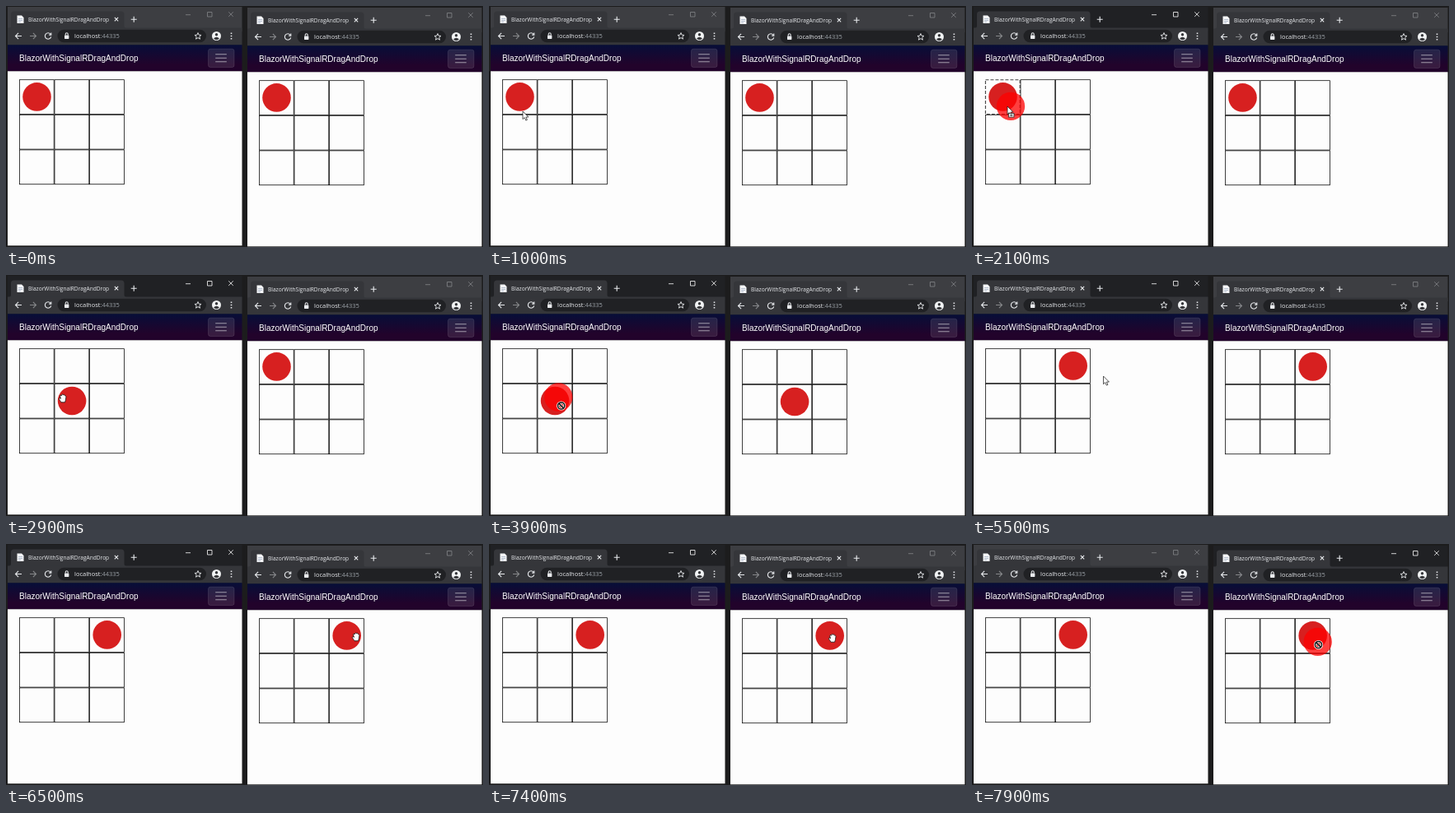
These frames come from a looping animation (579 px wide and 293 px high, 8000 ms). An HTML page:

```html
<!DOCTYPE html>
<html lang="en">
<head>
<meta charset="utf-8">
<title>Drag and drop</title>
<style>
html, body { margin: 0; width: 100%; height: 100%; overflow: hidden; background: #1c1c1d; }
svg { display: block; }
text { font-family: "Open Sans", sans-serif; white-space: pre; }
.brand { font: 10px "Liberation Sans", Arial, sans-serif; fill: #fff; }
.line { fill: none; stroke: #e8eaed; stroke-width: 1.1; }
.frame { fill: #3d3e42; }
.buttons { fill: none; stroke: #85868a; stroke-width: .8; }
.active .frame { fill: #202124; }
.active .buttons { stroke: #fff; }
.cell { fill: none; stroke: #000; stroke-width: .75; }
.cell.over { stroke: #444; stroke-width: 1.1; stroke-dasharray: 4 2; }
</style>
</head>
<body>
<svg id="stage" width="579" height="293" viewBox="0 0 579 293">
  <defs>
    <linearGradient id="nav" x2="0" y2="1">
      <stop offset="0" stop-color="#070e38"/>
      <stop offset=".75" stop-color="#22032b"/>
    </linearGradient>
  </defs>
  <g id="windows"></g>
  <circle id="ghost" r="17.2" fill="red" fill-opacity=".75"/>
  <g id="pointer">
    <g id="arrow">
      <path d="M0 0V9.6L2.2 7.6 3.8 11.1 5.4 10.4 3.9 7H6.9Z" fill="#fff" stroke="#111" stroke-width=".7"/>
      <g id="copy">
        <rect x="1.5" y="8.5" width="6.5" height="4.6" fill="#eee" stroke="#333" stroke-width=".8"/>
        <path d="M3 10.8h3.5M4.75 9.4v2.8" stroke="#333" stroke-width=".8"/>
      </g>
    </g>
    <path id="hand" d="M-2 4.8C-3 3-4.5 1.6-4.6.2-4.2-.8-3.2-.3-2.6.4L-3.4-3C-3.2-4.2-2.2-4-1.9-3L-1.3-4.4C-.8-5.2.2-5 .3-4L1-4.5C1.8-4.9 2.4-4.2 2.4-3.2 3.4-3.6 4-2.8 3.9-1.8L3.4 2 2.5 4.8Z" fill="#fff" stroke="#111" stroke-width=".8"/>
    <g id="deny" fill="none">
      <circle r="4.1" stroke="#fff" stroke-width="3"/>
      <path d="M-3-3 3 3" stroke="#fff" stroke-width="3"/>
      <circle r="4.1" stroke="#111" stroke-width="1.5"/>
      <path d="M-2.9-2.9 2.9 2.9" stroke="#111" stroke-width="1.5"/>
    </g>
  </g>
</svg>
<script>
const LOOP = 8000, STEP = 100, CELL = 42.6, LEFT = 16, TOP = 89.3;
const $ = id => document.getElementById(id);
const centre = cell => [37.5 + cell % 3 * CELL, 110.4 + Math.floor(cell / 3) * CELL];

const cells = [...Array(9).keys()].map(i =>
  `<rect class="cell" x="${LEFT + .4 + i % 3 * CELL}" y="${TOP + .4 + Math.floor(i / 3) * CELL}" width="${CELL - .8}" height="${CELL - .8}"/>`).join('');

const windowMarkup = i => `<g class="window" transform="translate(${291 * i} ${i})">
  <rect class="frame" x="2" y="1" width="284.5" height="30"/>
  <path d="M3 27Q6 27 6 24V10Q6 6.500 9.500 6.500H140Q143.500 6.500 143.500 10V24Q143.500 27 146.500 27Z" fill="#35363a"/>
  <path d="M13.500 11.500h5.500l2.500 2.500v7h-8z" fill="#f4f5f7"/>
  <path d="M15 15.500h5M15 17.500h5M15 19.300h3" stroke="#9aa6bd" stroke-width=".7"/>
  <text x="27" y="18.800" font-size="6.600" fill="#e8eaed">BlazorWithSignalRDragAndDrop</text>
  <path class="line" d="M131.800 13.900l4.400 4.400m0-4.400l-4.400 4.400M151.700 16.200h7M155.200 12.700v7"/>
  <path class="buttons" d="M218 10.700h6M244.500 7.500h5.500v5.500h-5.500zM270.200 7.300l5.600 5.600m0-5.600l-5.600 5.600"/>
  <rect x="2" y="26.500" width="284.500" height="21" fill="#35363a"/>
  <path class="line" d="M19 36.500h-7.500m3.600-3.600l-3.600 3.600 3.600 3.600"/>
  <path class="line" d="M29 36.500h7.500m-3.600-3.600l3.600 3.600-3.600 3.600" opacity=".45"/>
  <path class="line" d="M54 34.200A3.700 3.700 0 1 0 54.700 37.300M54.800 32.500v2.600h-2.600"/>
  <rect x="62.500" y="28.700" width="180.500" height="15.600" rx="7.800" fill="#202124"/>
  <rect x="71" y="35.400" width="5.400" height="4.500" rx=".6" fill="#e8eaed"/>
  <path class="line" d="M72.200 35.500v-1.200a1.500 1.500 0 0 1 3 0v1.200"/>
  <text x="83" y="39.200" font-size="7.500" fill="#e8eaed">localhost<tspan fill="#9aa0a6">:44335</tspan></text>
  <path class="line" stroke-linejoin="round" style="stroke-width:.9" d="M233 32.500l1.100 2.700 2.900.2-2.200 1.900.7 2.900-2.500-1.600-2.500 1.600.7-2.900-2.200-1.900 2.900-.2z"/>
  <circle cx="255.500" cy="36.500" r="5.500" fill="#f1f3f4"/>
  <circle cx="255.500" cy="34.800" r="1.700" fill="#35363a"/>
  <path d="M252 39.500q3.500-3.300 7 0-3.500 3.300-7 0" fill="#35363a"/>
  <path d="M273.500 32.400v1.600m0 1.700v1.600m0 1.700v1.600" stroke="#e8eaed" stroke-width="1.600"/>
  <rect x="2" y="47.300" width="284.500" height="32" fill="url(#nav)"/>
  <text class="brand" x="16" y="66.500">BlazorWithSignalRDragAndDrop</text>
  <rect x="245.500" y="52.200" width="31.500" height="22.300" rx="2.500" fill="#fff" fill-opacity=".1" stroke="#fff" stroke-opacity=".13" stroke-width=".8"/>
  <path d="M254.200 58.700h13.600M254.200 63.200h13.600M254.200 67.700h13.600" stroke="#fff" stroke-opacity=".55" stroke-width="1.100"/>
  <rect x="2" y="79.300" width="284.500" height="212" fill="#fdfdfd"/>
  ${cells}<circle class="disc" r="17.300" fill="#d72020"/></g>`;

$('windows').innerHTML = windowMarkup(0) + windowMarkup(1);
const windows = [...document.querySelectorAll('.window')].map(node => ({
  node, disc: node.querySelector('.disc'), cells: [...node.querySelectorAll('.cell')]
}));

// Pointer path: time, x, y
const path = [
  [300, 66, 238], [800, 44, 136], [1000, 41, 128], [1400, 36, 116], [1900, 33.5, 110.5],
  [2100, 43, 122], [2500, 70, 147], [2700, 71, 149], [2900, 69, 150], [3400, 79, 160],
  [3800, 83.5, 163.5], [4100, 96, 150], [4600, 121, 121], [4800, 123, 119], [5400, 126, 118],
  [5800, 260, 138], [6200, 454, 120], [6500, 425, 113], [7100, 419, 114], [7800, 414.5, 115],
  [7900, 420.5, 122.5]
];
const drags = [
  { win: 0, from: 0, start: 1900, end: 2700 },
  { win: 0, from: 4, start: 3800, end: 4800 },
  { win: 1, from: 2, start: 7800, end: LOOP }
];

function pointerAt(t) {
  const n = path.findIndex(p => p[0] >= t);
  if (n <= 0) return path[0].slice(1);
  const [a, b] = [path[n - 1], path[n]];
  const k = (t - a[0]) / (b[0] - a[0]);
  return [a[1] + (b[1] - a[1]) * k, a[2] + (b[2] - a[2]) * k];
}

const move = (node, x, y) => node.setAttribute('transform', `translate(${x} ${y})`);
const show = (node, on) => node.style.display = on ? '' : 'none';

function render(t) {
  const [x, y] = pointerAt(t);
  const drag = drags.find(d => t > d.start && t < d.end);
  const denied = drag && t <= drag.start + STEP;
  let hovering = false;

  windows.forEach((w, i) => {
    // The second window receives each move a little later.
    const cell = t < 2700 + 300 * i ? 0 : t < 4800 + 200 * i ? 4 : 2;
    const [cx, cy] = centre(cell), px = x - 291 * i, py = y - i;
    move(w.disc, cx, cy);
    hovering ||= Math.hypot(px - cx, py - cy) < 17.3;
    w.node.classList.toggle('active', i ? t >= 7700 : t >= 1900 && t < 7700);
    const col = Math.floor((px - LEFT) / CELL), row = Math.floor((py - TOP) / CELL);
    w.cells.forEach((c, n) => c.classList.toggle('over',
      !!drag && !denied && drag.win === i && n % 3 === col && Math.floor(n / 3) === row));
  });

  show($('ghost'), drag);
  if (drag) {
    const [sx, sy] = pointerAt(drag.start), [cx, cy] = centre(drag.from);
    move($('ghost'), cx + 291 * drag.win + x - sx, cy + drag.win + y - sy);
  }
  move($('pointer'), x, y);
  show($('pointer'), t >= 300);
  show($('deny'), denied);
  show($('hand'), !drag && hovering);
  show($('arrow'), drag ? !denied : !hovering);
  show($('copy'), drag);
}

const begin = performance.now();
function tick() {
  const t = (performance.now() - begin) % LOOP;
  render(Math.floor(t / STEP) * STEP);
  requestAnimationFrame(tick);
}
tick();
</script>
</body>
</html>
```
